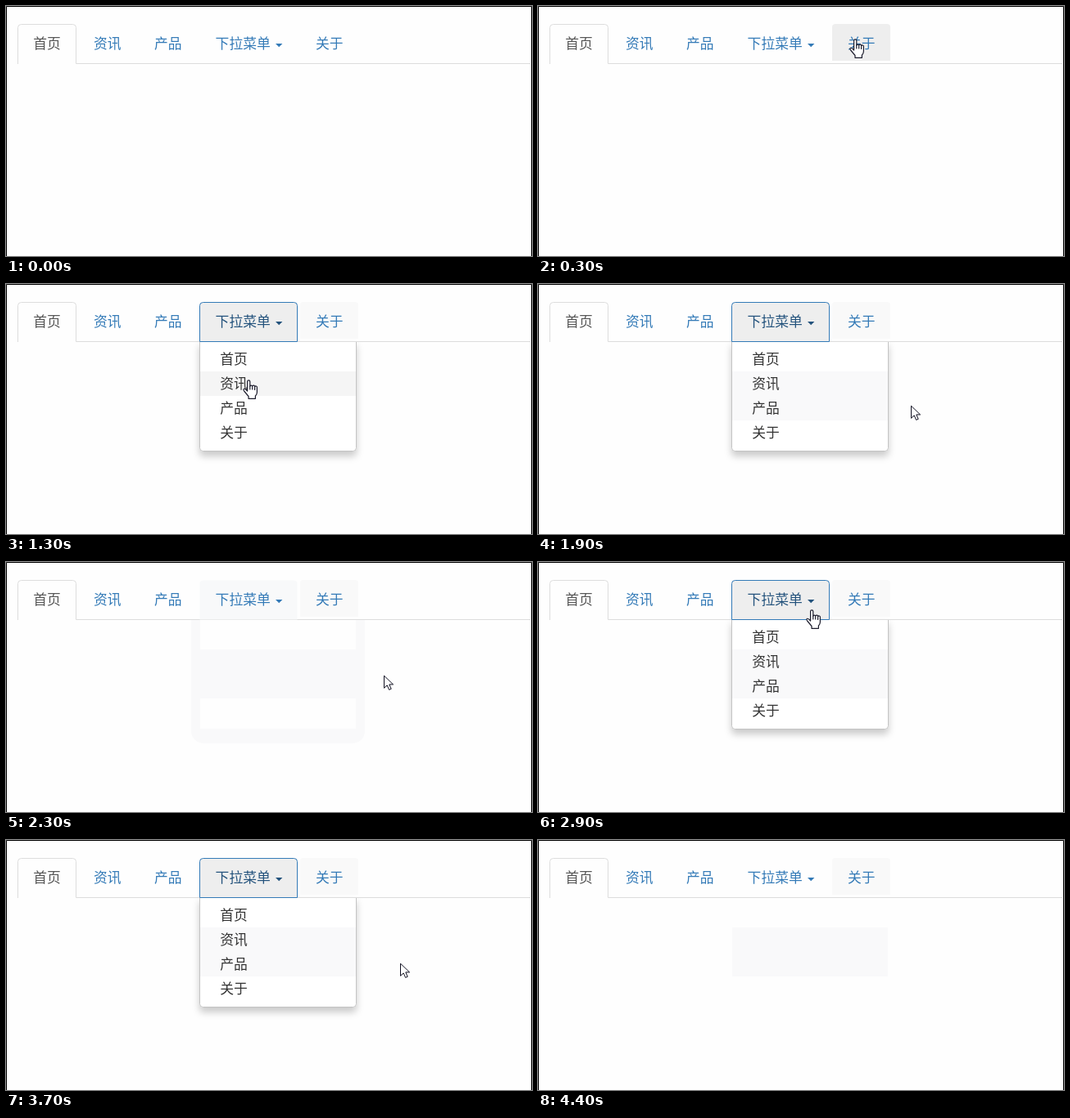
Animation, 642 px wide and 306 px high, one loop 5100 ms. Source, as an HTML page:

```html
<!DOCTYPE html>
<html lang="zh">
<head>
<meta charset="utf-8">
<title>下拉菜单</title>
<style>
  html, body { margin: 0; width: 100%; height: 100%; overflow: hidden; background: #fff; }
  svg { display: block; width: 642px; height: 306px; }
  text { font: 300 16.8px "Noto Sans CJK SC", "Noto Sans CJK", sans-serif; }
  .link { fill: #337ab7; }
  .item { fill: #333; }
  .tint { fill: #f9f9fa; }
</style>
</head>
<body>
<svg viewBox="0 0 642 306">
  <defs>
    <filter id="shadow" x="-20%" y="-20%" width="140%" height="150%">
      <feDropShadow dx="0" dy="6" stdDeviation="4.5" flood-color="#000" flood-opacity=".2"/>
    </filter>
  </defs>
  <rect width="642" height="306" fill="#fefefe"/>

  <path id="halo" class="tint" d="M226 70H438V207a15 15 0 0 1 -15 15H241a15 15 0 0 1 -15 -15Z
    M237 71V107H427V71Z M237 167V204H427V167Z" fill-rule="evenodd"/>
  <g id="menu">
    <path d="M236.5 70.5H427.5V200.5a4 4 0 0 1 -4 4H240.5a4 4 0 0 1 -4 -4Z"
      fill="#fff" stroke="#c4c4c4" filter="url(#shadow)"/>
  </g>
  <rect id="rowTint" class="tint" x="237" y="107" width="190"/>
  <rect id="rowHover" x="237" width="190" height="30" fill="#f5f5f5"/>
  <g id="items"></g>

  <path d="M14 70.5H640" stroke="#ddd"/>
  <path d="M14.5 71V26.5a4 4 0 0 1 4 -4H81.5a4 4 0 0 1 4 4V71" fill="#fefefe"/>
  <path d="M14.5 71V26.5a4 4 0 0 1 4 -4H81.5a4 4 0 0 1 4 4V70.5" fill="none" stroke="#ddd"/>
  <path id="about" d="M359 67V26a4 4 0 0 1 4 -4H426a4 4 0 0 1 4 4V67Z"/>
  <path id="toggle" d="M236.5 70.5V26.5a4 4 0 0 1 4 -4H351.5a4 4 0 0 1 4 4V70.5Z"/>
  <g id="tabs"></g>
  <path id="caret" d="M329 46H337.4L333.2 50.2Z"/>

  <g id="arrow" fill="#fff" stroke="#111122" stroke-linejoin="miter">
    <path d="M.5 1.2V16.3L4.2 12.9L6.6 18.4L9.2 17.3L6.8 11.9H11.6Z"/>
  </g>
  <g id="hand" fill="#fff" stroke="#1c1c2c" stroke-width="1.2" stroke-linejoin="round" stroke-linecap="round">
    <path d="M5.6 14V2.4a1.6 1.6 0 0 1 3.2 0V8.2a1.5 1.5 0 0 1 2.9 0
      a1.5 1.5 0 0 1 2.9 .8a1.4 1.4 0 0 1 2.8 .8V15.5Q17.4 18 15.4 20V23.3H7V20.5
      L2 14.5Q0 12 1.6 11.3Q3 10.8 5.6 14Z"/>
    <path d="M8.8 8V12M11.7 8.5V12M14.6 9.5V12.5" fill="none"/>
  </g>
  <path d="M.5 306V.5H641.5V306" fill="none" stroke="#000"/>
</svg>
<script>
const LOOP = 5100;
const $ = id => document.getElementById(id);

function addText(parent, label, x, y, cls) {
  const el = document.createElementNS("http://www.w3.org/2000/svg", "text");
  el.textContent = label;
  el.setAttribute("x", x);
  el.setAttribute("y", y);
  el.setAttribute("class", cls);
  return parent.appendChild(el);
}

const set = (id, attrs) => Object.entries(attrs).forEach(([k, v]) => $(id).setAttribute(k, v));
const show = (id, on) => set(id, { visibility: on ? "visible" : "hidden" });

addText($("tabs"), "首页", 33.2, 51.5, "link").style.fill = "#555";
addText($("tabs"), "资讯", 107, 51.5, "link");
addText($("tabs"), "产品", 181, 51.5, "link");
const toggleText = addText($("tabs"), "下拉菜单", 255.6, 51.5, "link");
addText($("tabs"), "关于", 378, 51.5, "link");
["首页", "资讯", "产品", "关于"].forEach((label, i) =>
  addText($("items"), label, 261.2, 97.5 + 30 * i, "item"));

// Pointer stops: start time, shape, left, top
const stops = [
  [0, "none", 0, 0],
  [200, "arrow", 521, 38], [300, "hand", 380, 40],
  [400, "hand", 310, 38], [500, "hand", 285, 36],
  [700, "arrow", 291, 36], [800, "hand", 285, 36],
  [1100, "hand", 286, 60], [1200, "hand", 288, 95], [1300, "hand", 289, 117],
  [1500, "hand", 291, 124], [1600, "hand", 299, 141], [1700, "hand", 370, 143],
  [1800, "arrow", 443, 144], [1900, "arrow", 455, 148], [2000, "arrow", 467, 149],
  [2300, "arrow", 461, 138], [2400, "arrow", 375, 100],
  [2500, "hand", 333, 68], [2600, "hand", 327, 58],
  [3000, "hand", 327, 72], [3100, "hand", 324, 102], [3200, "hand", 322, 128],
  [3400, "hand", 370, 138], [3500, "arrow", 445, 146],
  [3600, "arrow", 465, 149], [3700, "arrow", 481, 150],
  [4300, "arrow", 602, 141], [4400, "none", 0, 0]
];

function draw(t) {
  const within = (a, b) => t >= a && t < b;
  const [, shape, x, y] = stops.filter(s => s[0] <= t).pop();
  const open = within(800, 2300) || within(2900, 4100);
  const hover = within(400, 800) || within(2500, 2900);
  const fading = within(2300, 2500);
  const focused = within(400, 2100) || within(2500, 4000);

  show("menu", open);
  show("items", open);
  show("halo", within(2300, 2900));
  set("rowTint", { height: t < 1300 ? 0 : t < 1600 ? 30 : 60 });

  const row = Math.floor((y - 77) / 30);
  show("rowHover", open && shape === "hand" && row >= 0 && row < 4);
  set("rowHover", { y: 77 + 30 * row });

  show("about", t >= 300);
  set("about", { fill: within(300, 400) ? "#eee" : "#f9f9f9" });

  show("toggle", open || hover || fading);
  set("toggle", {
    fill: fading ? "#f8f9fa" : "#eee",
    stroke: open ? "#337ab7" : hover ? "#eaeaea" : "none"
  });
  const ink = focused ? "#23527c" : "#337ab7";
  toggleText.style.fill = ink;
  set("caret", { fill: ink });

  for (const id of ["arrow", "hand"]) {
    show(id, id === shape);
    set(id, { transform: `translate(${x} ${y})` });
  }
}

const start = performance.now();
function tick() {
  draw((performance.now() - start) % LOOP);
  requestAnimationFrame(tick);
}
tick();
</script>
</body>
</html>
```
